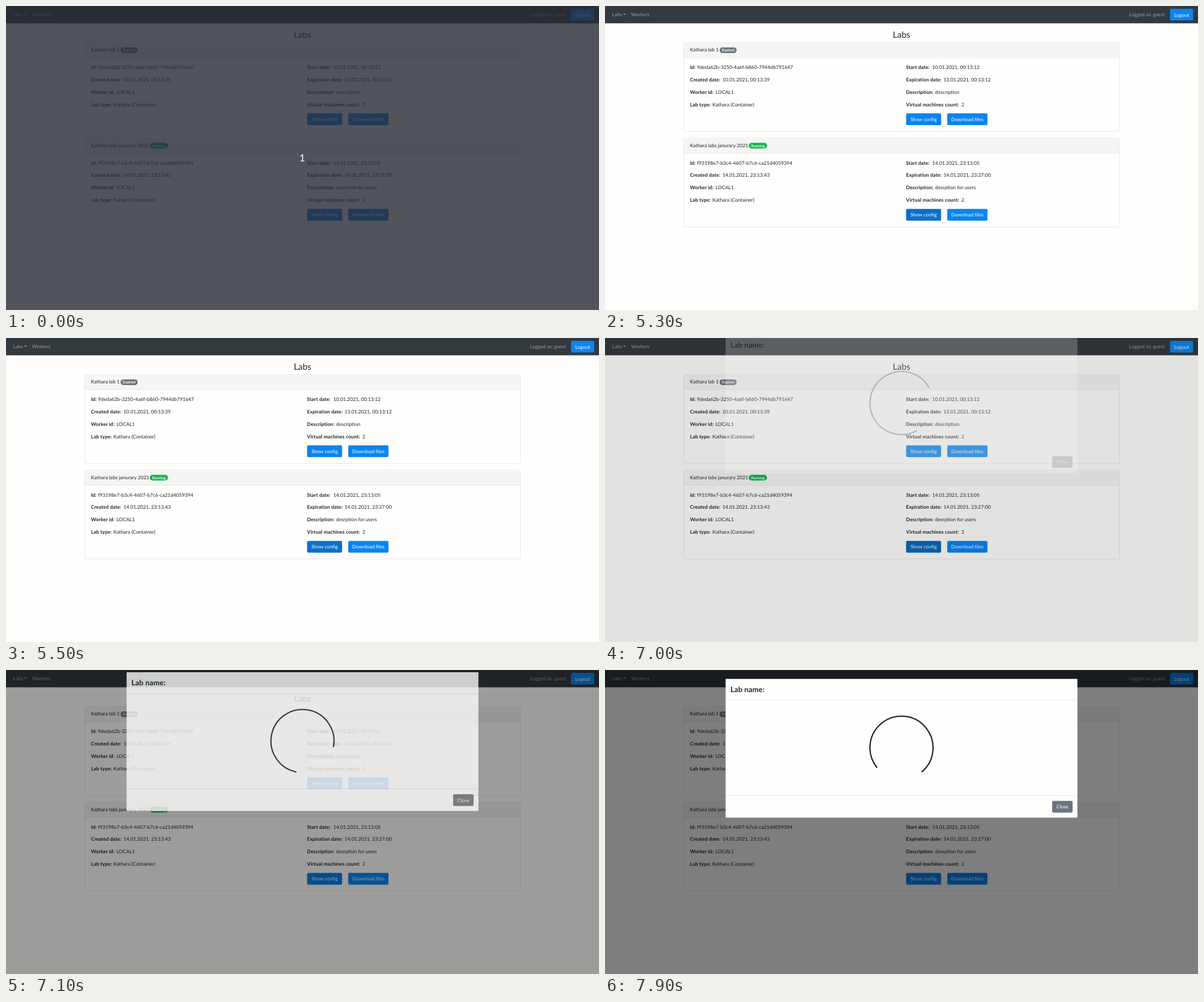
These frames come from a looping animation (1045 by 536 pixels, 8 s). An HTML page:

```html
<!DOCTYPE html>
<html lang="en">
<head>
<meta charset="utf-8">
<title>Labs</title>
<style>
html, body { margin: 0; width: 100%; height: 100%; overflow: hidden; background: #fefefd; }
svg { display: block; width: 1045px; height: 536px; }
text { font: 8.71px Lato, "Noto Sans", sans-serif; fill: #212529; white-space: pre; text-rendering: geometricPrecision; }
.bold { font-weight: 700; letter-spacing: .01em; }
.nav { fill: #9a9da0; }
.white { fill: #fff; }
.mid { text-anchor: middle; }
.badge { font-size: 6.53px; font-weight: 700; }
.h3 { font-size: 15.24px; }
.h4 { font-size: 13.06px; }
.count { font-size: 17.5px; }
</style>
</head>
<body>
<svg id="stage" viewBox="0 0 1045 536"></svg>
<script>
const BLUE = '#0a84f2', HOVER = '#0b70cb', ACTIVE = '#0a67bb', GRAY = '#6c757d', EDGE = '#d8d8d8';

const rect = (x, y, w, h, fill, extra = '') =>
  `<rect x="${x}" y="${y}" width="${w}" height="${h}" fill="${fill}" ${extra}/>`;
const text = (x, y, s, cls = '') => `<text x="${x}" y="${y}" class="${cls}">${s}</text>`;
const line = (x1, x2, y) => `<path d="M${x1} ${y}H${x2}" stroke="${EDGE}" stroke-width=".6"/>`;
const button = (x, y, w, label, fill = BLUE, id = '') =>
  rect(x, y, w, 20.7, fill, `rx="2.2" ${id && `id="${id}"`}`) +
  text(x + w / 2, y + 13.6, label, 'mid white');
const field = (x, row, label, valueX, value) => {
  const y = 46.8 + row * 21.77;
  return text(x, y, label + ':', 'bold') + text(valueX, y, value);
};

function card(y, lab) {
  const left = 149.8, right = 530.6;
  return `<g transform="translate(0 ${y})">` +
    rect(138.5, 0, 768, 156.8, '#fefefd', `rx="2.2" stroke="${EDGE}" stroke-width=".6"`) +
    rect(138.8, .3, 767.4, 26.2, '#f6f5f4') + line(138.8, 906.2, 26.6) +
    text(left, 16.1, lab.name) +
    rect(lab.badgeX, 8.5, lab.badgeW, 10, lab.color, 'rx="5"') +
    text(lab.badgeX + lab.badgeW / 2, 15.8, lab.state, 'badge mid white') +
    field(left, 0, 'Id', 162, lab.id) +
    field(left, 1, 'Created date', 207, lab.created) +
    field(left, 2, 'Worker id', 194.7, 'LOCAL1') +
    field(left, 3, 'Lab type', 189.3, 'Kathara (Container)') +
    field(right, 0, 'Start date', 576.8, lab.start) +
    field(right, 1, 'Expiration date', 596.5, lab.end) +
    field(right, 2, 'Description', 581.8, lab.about) +
    field(right, 3, 'Virtual machines count', 628, '2') +
    button(right, 124.9, 61.7, 'Show config', BLUE, lab.button) +
    button(603.1, 124.9, 70.9, 'Download files') + '</g>';
}

const page =
  rect(0, 0, 1045, 536, '#fefefd') + rect(0, 0, 1045, 30.5, '#32393f') +
  text(12.5, 18.2, 'Labs', 'nav') + '<path d="M32 13.5h5l-2.5 2.6z" fill="#9a9da0"/>' +
  text(46, 18.2, 'Workers', 'nav') + text(923.5, 17.8, 'Logged as: guest', 'nav') +
  button(995.8, 4.9, 40.7, 'Logout') +
  text(522.5, 56, 'Labs', 'h3 mid') +
  card(64.4, {
    name: 'Kathara lab 1', state: 'Expired', color: GRAY, badgeX: 202, badgeW: 30,
    id: '9deda62b-3250-4a6f-b860-7944db791647', created: '10.01.2021, 00:13:39',
    start: '10.01.2021, 00:13:12', end: '13.01.2021, 00:13:12', about: 'description', button: ''
  }) +
  card(232.8, {
    name: 'Kathara labs janurary 2021', state: 'Running', color: '#10b550', badgeX: 253.3, badgeW: 32.2,
    id: 'f93198e7-b3c4-4607-b7c6-ca21d4059394', created: '14.01.2021, 23:13:43',
    start: '14.01.2021, 23:13:05', end: '14.01.2021, 23:27:00', about: 'desrption for users', button: 'config'
  });

const modal =
  rect(212.5, 15.7, 620, 244.6, '#fefefd') +
  line(212.5, 832.5, 53.4) + line(212.5, 832.5, 221.4) +
  text(221, 39, 'Lab name:', 'h4 bold') +
  '<circle id="spinner" cx="522.5" cy="137" r="55.6" fill="none" stroke="#212529" stroke-width="2.3" pathLength="4" stroke-dasharray="3 1"/>' +
  button(788, 230.7, 36, 'Close', GRAY);

stage.innerHTML = page +
  rect(0, 0, 1045, 536, '#000', 'id="backdrop"') +
  `<g id="modal">${modal}</g>` +
  `<g id="countdown">${rect(0, 0, 1045, 536, '#262a34', 'opacity=".8"')}${text(522, 274, '1', 'count mid white')}</g>`;

const part = Object.fromEntries(['backdrop', 'modal', 'spinner', 'countdown', 'config']
  .map(id => [id, document.getElementById(id)]));

const buttonColor = t =>
  t < 5300 || t >= 7200 ? BLUE : t < 6800 ? HOVER : t < 7100 ? ACTIVE : '#0a7ee6';

function draw(now) {
  const t = Math.floor(now % 8000 / 100) * 100;
  const step = (t - 7000) / 100;
  // milliseconds since the dialog began to open
  const age = step < 0 ? 0 : step < 1 ? 33 : 117 + (step - 1) * 104;
  const fade = Math.min(1, age / 150);
  const slide = Math.min(1, age / 300);

  part.countdown.style.display = t < 100 ? '' : 'none';
  part.config.setAttribute('fill', buttonColor(t));
  part.backdrop.setAttribute('opacity', fade / 2);
  part.modal.setAttribute('opacity', fade);
  part.modal.setAttribute('transform', `translate(0 ${-27.2 * (1 - slide) ** 1.7})`);
  part.spinner.setAttribute('transform', `rotate(${age / 750 * 360 + 45} 522.5 137)`);
}

const begin = performance.now();
function loop() {
  draw(performance.now() - begin);
  requestAnimationFrame(loop);
}
loop();
</script>
</body>
</html>
```
